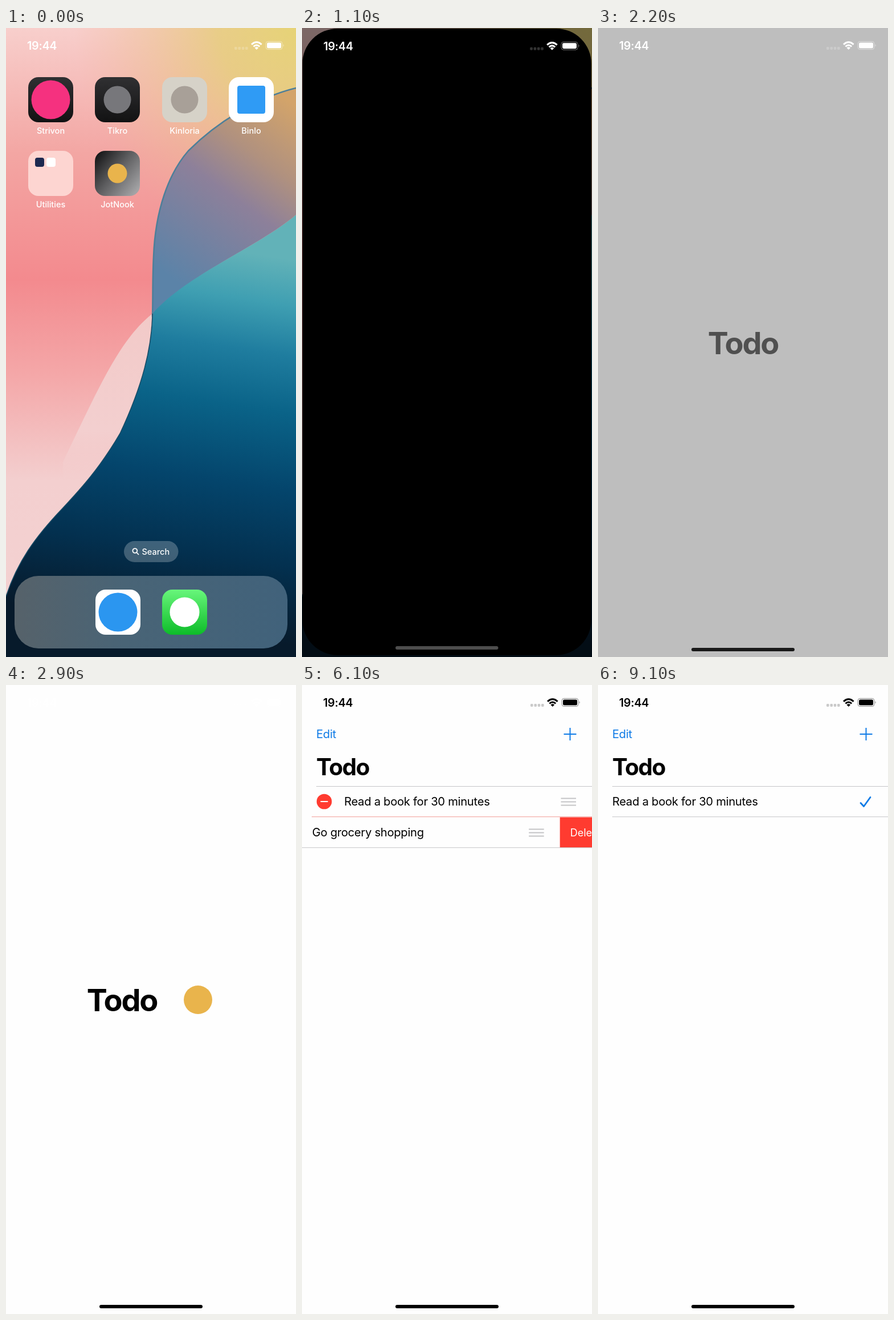
Recreate the animation shown at these times as an HTML page. Size 509 px wide and 1101 px high, loop 9200 ms.

```html
<!DOCTYPE html>
<html lang="en">
<head>
<meta charset="utf-8">
<title>Todo list</title>
<style>
html, body { margin: 0; width: 100%; height: 100%; overflow: hidden; background: #000; }
svg { display: block; width: 100%; height: 100%; font-family: Inter, Roboto, sans-serif; }
.body { font-size: 20.2px; letter-spacing: -.28px; }
.label { font-size: 14.5px; font-weight: 500; fill: #fff; text-anchor: middle; }
.line { stroke: #c6c6c8; stroke-width: 1; }
.blue { stroke: #0f7be6; fill: none; }
</style>
</head>
<body>
<svg viewBox="0 0 509 1101" preserveAspectRatio="none">
  <defs>
    <linearGradient id="pink" x2="0" y2="1">
      <stop stop-color="#f8cfcc"/><stop offset=".2" stop-color="#f3a6a3"/>
      <stop offset=".4" stop-color="#f38a8e"/><stop offset=".55" stop-color="#f4a7a8"/>
      <stop offset=".72" stop-color="#f3cfcf"/><stop offset="1" stop-color="#f3d2d2"/>
    </linearGradient>
    <radialGradient id="sun" gradientUnits="userSpaceOnUse" cx="509" cy="0" r="390">
      <stop stop-color="#e6d377"/><stop offset=".35" stop-color="#e6cd7c" stop-opacity=".85"/>
      <stop offset="1" stop-color="#efb795" stop-opacity="0"/>
    </radialGradient>
    <linearGradient id="glass" gradientUnits="userSpaceOnUse" x1="500" y1="130" x2="280" y2="430">
      <stop stop-color="#d3a46a"/><stop offset=".3" stop-color="#b0917f"/>
      <stop offset=".52" stop-color="#8d809a"/><stop offset="1" stop-color="#5b83a8"/>
    </linearGradient>
    <linearGradient id="sea" gradientUnits="userSpaceOnUse" x1="400" y1="390" x2="300" y2="1050">
      <stop stop-color="#62b2b8"/><stop offset=".12" stop-color="#3f9fb2"/>
      <stop offset=".25" stop-color="#1f7d9f"/><stop offset=".4" stop-color="#0a6388"/>
      <stop offset=".6" stop-color="#04456c"/><stop offset=".8" stop-color="#03304f"/>
      <stop offset="1" stop-color="#071a2b"/>
    </linearGradient>
    <linearGradient id="fold" x2="0" y2="1">
      <stop stop-color="#f2cac8"/><stop offset=".6" stop-color="#f3cfcf"/>
      <stop offset="1" stop-color="#f3cfcf" stop-opacity="0"/>
    </linearGradient>
    <linearGradient id="dock">
      <stop stop-color="#56626a"/><stop offset=".4" stop-color="#496476"/><stop offset="1" stop-color="#41627b"/>
    </linearGradient>
    <linearGradient id="dark" x2="0" y2="1"><stop stop-color="#303032"/><stop offset="1" stop-color="#121213"/></linearGradient>
    <linearGradient id="green" x2="0" y2="1"><stop stop-color="#68f67b"/><stop offset="1" stop-color="#0dbc29"/></linearGradient>
    <linearGradient id="steel" x2="1" y2=".8"><stop stop-color="#0c0c0d"/><stop offset=".5" stop-color="#5c5c5e"/><stop offset="1" stop-color="#a3a3a5"/></linearGradient>
    <clipPath id="winClip"><rect id="winBox"/></clipPath>
    <clipPath id="rowClip"><rect id="rowBox" y="231.5" width="509" height="54"/></clipPath>
    <g id="bar">
      <text x="37" y="38" font-size="19.8" font-weight="600" letter-spacing="-.3" fill="currentColor">19:44</text>
      <g fill="currentColor" opacity=".2">
        <rect x="401" y="33" width="4.6" height="5" rx="1.4"/><rect x="407.4" y="33" width="4.6" height="5" rx="1.4"/>
        <rect x="413.7" y="33" width="4.6" height="5" rx="1.4"/><rect x="420" y="33" width="4.6" height="5" rx="1.4"/>
      </g>
      <g fill="none" stroke="currentColor" stroke-width="3">
        <path d="M431 28.8Q439.800 20.800 448.600 28.800M434.400 32.500Q439.800 27.600 445.200 32.500"/>
      </g>
      <path d="M439.800 38L436.500 34.700Q439.800 32 443.100 34.700Z" fill="currentColor"/>
      <rect x="456" y="23.500" width="29" height="14" rx="4" fill="none" stroke="currentColor" opacity=".45"/>
      <rect x="458" y="25.500" width="25" height="10" rx="2.500" fill="currentColor"/>
      <path d="M486.600 28.300Q488.600 30.500 486.600 32.700Z" fill="currentColor" opacity=".5"/>
    </g>
    <g id="grip" stroke="#c4c4c6" stroke-width="1.800">
      <path d="M454.500 -5.500H481M454.500 .500H481M454.500 6.500H481"/>
    </g>
    <g id="minus">
      <circle cx="39" r="13.300" fill="#ff3b30"/><path d="M32.500 0H45.500" stroke="#fff" stroke-width="2"/>
    </g>
  </defs>

  <g id="home">
    <rect width="509" height="1101" fill="url(#pink)"/>
    <rect width="509" height="1101" fill="url(#sun)"/>
    <path d="M257 500C200 545 165 625 100 760V840C130 808 165 770 200 710C240 625 256 560 257 500Z" fill="url(#fold)"/>
    <path d="M509 105C440 122 370 165 320 215C285 255 262 320 259 400C257 440 258 470 257 502C320 430 440 385 509 327Z" fill="url(#glass)"/>
    <path d="M509 327C440 385 320 430 257 500C256 560 240 625 200 710C165 770 130 808 100 840C50 892 20 935 0 995V1101H509Z" fill="url(#sea)"/>
    <path d="M509 105C440 122 370 165 320 215C285 255 262 320 259 400C257 440 258 470 257 505" fill="none" stroke="#4d7f99" stroke-width="2.500"/>
    <path d="M257 500C256 560 240 625 200 710C165 770 130 808 100 840C50 892 20 935 0 995" fill="none" stroke="#174a64" stroke-width="1.500"/>
    <g id="apps">
      <rect x="207" y="898" width="95.500" height="37" rx="18.500" fill="#fff" fill-opacity=".24"/>
      <g fill="none" stroke="#fff" stroke-width="1.800"><circle cx="226.300" cy="915" r="3.900"/><path d="M229.200 918L233 922"/></g>
      <text x="238.500" y="922" font-size="14.500" font-weight="500" fill="#fff">Search</text>
      <rect x="15" y="959" width="479" height="127" rx="42" fill="url(#dock)"/>
      <g id="tiles"></g>
      <rect id="press" x="156" y="215" width="79" height="79" rx="18" opacity="0"/>
    </g>
    <use id="homeBar" href="#bar" color="#fff"/>
    <rect id="dim" width="509" height="1101"/>
  </g>

  <g id="win" clip-path="url(#winClip)">
    <g id="page">
      <rect id="paper" width="509" height="1110"/>
      <g id="splash">
        <text id="word" y="571" font-size="54" font-weight="700" letter-spacing="-2.200" text-anchor="middle"></text>
        <circle id="dot" cx="337" cy="551" r="25" fill="#e9b44c"/>
      </g>
      <g id="list">
        <text id="edit" class="body" x="25" y="93" fill="#0f7be6">Edit</text>
        <path class="blue" d="M459.500 86H481.500M470.500 75V97" stroke-width="2"/>
        <text x="25" y="158" font-size="40.500" font-weight="700" letter-spacing="-1.600">Todo</text>
        <path class="line" d="M25 177.500H509"/>
        <g id="rowA" transform="translate(0 204)">
          <text class="body" y="7">Read a book for 30 minutes</text>
          <use href="#minus"/><use href="#grip"/>
        </g>
        <path id="check" class="blue" d="M461 206.500L466.500 212.500L478 196.500" stroke-width="2.800" stroke-linecap="round" stroke-linejoin="round"/>
        <g id="second">
          <g clip-path="url(#rowClip)">
            <g id="slide">
              <g id="rowB" transform="translate(0 258)">
                <text class="body" y="7">Go grocery shopping</text>
                <use href="#minus"/><use href="#grip"/>
              </g>
              <rect x="509" y="231" width="509" height="54" fill="#ff3b30"/>
              <text x="527" y="265" font-size="18" fill="#fff">Delete</text>
            </g>
          </g>
          <path id="bottom" class="line"/>
        </g>
        <path id="middle" class="line"/>
      </g>
      <use id="appBar" href="#bar"/>
      <rect id="handle" x="164" y="1085" width="181" height="6" rx="3"/>
    </g>
    <rect id="cover" fill="url(#steel)"/>
  </g>
</svg>
<script>
const LOOP = 9200, W = 509, H = 1101, TILE = 79;
const $ = Object.fromEntries([...document.querySelectorAll('[id]')].map(el => [el.id, el]));

const set = (el, attrs) => { for (const k in attrs) el.setAttribute(k, attrs[k]); };
const show = (el, on) => { el.style.display = on ? '' : 'none'; };
const clamp = x => Math.max(0, Math.min(1, x));
const mix = (a, b, p) => a + (b - a) * p;
const gray = v => { const n = Math.round(v); return `rgb(${n},${n},${n})`; };
const span = (t, start, length) => clamp((t - start) / length);
const easeOut = (x, power) => 1 - (1 - x) ** power;
const easeSine = x => (1 - Math.cos(Math.PI * x)) / 2;

// Home screen tiles: a plain mark in the middle of each
const round = (r, fill) => `<circle cx="39.5" cy="39.5" r="${r}" fill="${fill}"/>`;
const box = (x, y, s, fill, rx = 4) => `<rect x="${x}" y="${y}" width="${s}" height="${s}" rx="${rx}" fill="${fill}"/>`;
const tile = (x, y, fill, mark, name = '') =>
  `<g transform="translate(${x} ${y})">${box(0, 0, TILE, fill, 18)}${mark}
   <text class="label" x="39.5" y="99">${name}</text></g>`;

$.tiles.innerHTML = [
  tile(39, 86, 'url(#dark)', round(34, '#f5317f'), 'Strivon'),
  tile(156, 86, 'url(#dark)', round(24, '#77777b'), 'Tikro'),
  tile(274, 86, '#d6d2c8', round(24, '#a8a098'), 'Kinloria'),
  tile(391, 86, '#fff', box(15, 15, 49, '#2f9bf5'), 'Binlo'),
  tile(39, 215, '#fdd5d1', box(12, 12, 16, '#1d2950') + box(32, 12, 16, '#fff'), 'Utilities'),
  tile(156, 215, 'url(#steel)', round(17, '#e9b44c'), 'JotNook'),
  tile(157, 983, '#fff', round(34, '#2b96f0')),
  tile(274, 983, 'url(#green)', round(26, '#fff'))
].join('');

function drawHome(t, p) {
  show($.home, t < 1600);
  show($.homeBar, p < .3);
  set($.press, { opacity: t >= 500 ? .35 : 0 });
  set($.dim, { opacity: .5 * p });
  const s = 1 - .1 * p;
  set($.apps, {
    opacity: 1 - p,
    transform: `translate(${W / 2 * (1 - s)} ${H / 2 * (1 - s)}) scale(${s})`
  });
}

function drawWindow(t, p) {
  show($.win, t >= 700);
  const width = mix(TILE, W, p), height = mix(TILE, H, p);
  const x = mix(195.5, W / 2, p) - width / 2, y = mix(254.5, H / 2, p) - height / 2;
  const rx = t < 1400 ? mix(18, 62, p) : 0;
  set($.winBox, { x, y, width, height, rx });
  set($.cover, { x, y, width, height, opacity: clamp(1 - p * 1.6) });
  set($.page, { transform: `translate(${x} ${y}) scale(${width / W})` });
}

function drawSplash(t) {
  const light = easeSine(span(t, 1400, 1200));
  const ground = 254 * light;
  const typed = Math.floor((t - 1340) / 220) + 1;
  const spaces = Math.max(0, Math.min(3, typed - 4));
  const done = typed >= 8;
  $.word.textContent = 'Todo'.slice(0, Math.max(0, typed));
  set($.word, {
    x: 254.5 - spaces * 7 - (done ? 30 : 0),
    fill: gray(mix(ground, 254 - ground, span(t, 1680, 600)))
  });
  show($.dot, done);
  show($.splash, t < 3700);
  set($.paper, { fill: gray(ground) });
  set($.handle, { fill: gray(Math.max(0, 77 - 104 * Math.max(0, light - .25))) });
  set($.appBar, { color: t < 3700 ? '#fff' : '#000' });
}

function drawRow(row, edit) {
  const [text, minus, grip] = row.children;
  set(text, { x: 25 + 49 * edit });
  set(minus, { x: -49 * (1 - edit), opacity: edit });
  set(grip, { x: 49 * (1 - edit), opacity: edit });
}

function drawList(t) {
  show($.list, t >= 3700);
  const edit = easeOut(span(t, 4950, 550), 3) - easeOut(span(t, 8750, 350), 3);
  const open = easeOut(span(t, 5950, 700), 4);
  const gone = easeOut(span(t, 7230, 700), 4);
  const press = t < 7000 ? 4900 : 8700;
  const off = mix(91 * open, W, gone);
  const tall = 54 * (1 - gone);

  set($.edit, { opacity: t < press ? 1 : mix(.2, 1, span(t, press + 100, 300)) });
  drawRow($.rowA, edit);
  drawRow($.rowB, edit);
  set($.check, { opacity: 1 - edit });
  show($.second, gone < 1);
  set($.slide, { transform: `translate(${-off} 0)` });
  set($.rowBox, { height: tall });
  set($.bottom, { d: `M${Math.max(0, 25 - off)} ${230.7 + tall}H509` });
  const slid = off > 0 && gone < 1;
  set($.middle, { d: `M${slid ? 17 : 25} 230.7H509` });
  $.middle.style.stroke = slid ? '#f19a96' : '';
}

function draw(time) {
  const t = Math.floor(time % LOOP / 100) * 100;
  const k = 17 * Math.max(0, t - 650) / 1000;
  const p = t < 1600 ? 1 - (1 + k) * Math.exp(-k) : 1;
  drawHome(t, p);
  drawWindow(t, p);
  drawSplash(t);
  drawList(t);
}

const start = performance.now();
function tick() {
  draw(performance.now() - start);
  requestAnimationFrame(tick);
}
tick();
</script>
</body>
</html>
```
